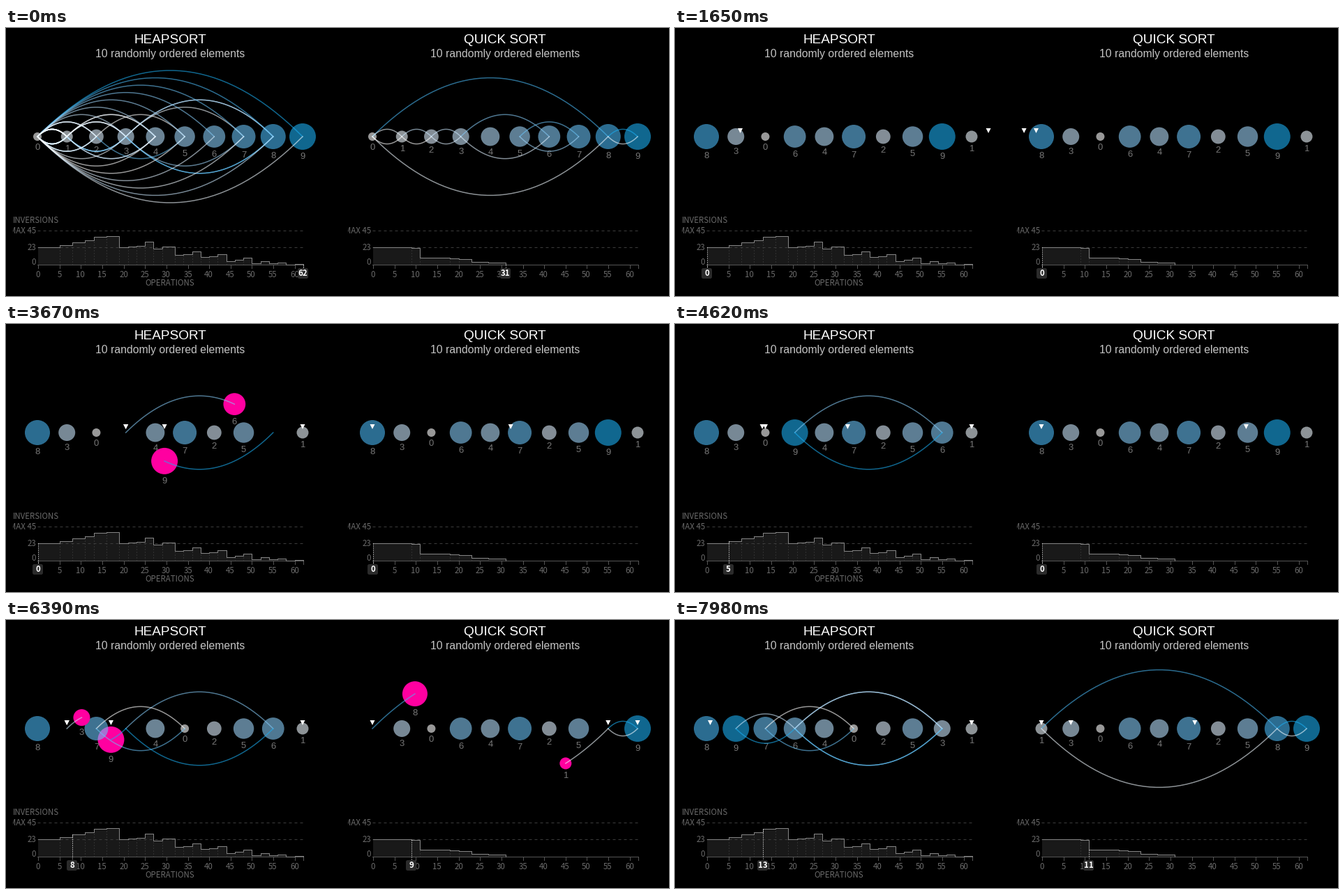
Animation, 950 px wide and 385 px high, one loop 8000 ms. Source, as a matplotlib script:

```python
import matplotlib.pyplot as plt
import numpy as np
from matplotlib.animation import FuncAnimation
from matplotlib.patches import Circle, FancyBboxPatch, Polygon, Rectangle

W, H, DPI = 950, 385, 100
LOOP, INTERVAL = 8000, 40
START = [8, 3, 0, 6, 4, 7, 2, 5, 9, 1]
N = len(START)
MID, GAP = 156, 380 / 9
BASE, OP_W, INV_H = 339.5, 380 / 62, 49 / 45
ALPHA, PINK = 0.6, "#ff00a0"
SANS, LABEL = "Liberation Sans", "Noto Sans CJK JP"

# The picture is refreshed 54 times per loop; (refresh number, ms) knots.
KNOTS = [(1, 870), (3, 1140), (8, 1800), (9, 1920), (14, 2610), (16, 2890),
         (17, 3010), (24, 3950), (25, 4100), (29, 4620), (32, 5040),
         (33, 5190), (36, 5580), (40, 6120), (41, 6240), (46, 6930),
         (48, 7200), (49, 7320), (54, 7980)]
TICKS = np.append(0, np.interp(np.arange(1, 55), *zip(*KNOTS)))


def px(size):
    return size * 72 / DPI


def ease(t):
    return 4 * t ** 3 if t < 0.5 else 1 - 4 * (1 - t) ** 3


def radius(v):
    return 6 * np.sqrt(v + 1)


def color(v):
    u = v / (N - 1)
    r = ((1 - u) + u * 0.105 ** 1.6) ** (1 / 1.6)
    return r, 1 - 0.32 * u, 1 - 0.06 * u


def inversions(a):
    return sum(a[i] > a[j] for i in range(N) for j in range(i + 1, N))


def heap_ops():
    """List of (markers, swap): markers are last, index, root, largest."""
    a, ops = list(START), []

    def swap(i, j, marks):
        a[i], a[j] = a[j], a[i]
        ops.append((marks, (i, j)))

    def sift(root, size, last, i):
        while 2 * root + 1 < size:
            kids = range(2 * root + 1, min(2 * root + 3, size))
            big = max([root, *kids], key=lambda k: a[k])
            ops.append(((last, i, root, big), None))
            if big == root:
                break
            swap(root, big, (last, i, root, root))
            root = big

    for i in range(N // 2 - 1, -1, -1):
        ops.append(((N - 1, i, None, None), None))
        sift(i, N, N - 1, i)
    for end in range(N - 1, 0, -1):
        marks = (end, 0, None, None)
        ops.append((marks, None))
        swap(0, end, marks)
        sift(0, end, end, 0)
    return ops


def quick_ops():
    """List of (markers, swap): markers are pivot, left, right."""
    marks = [(0, k, None) for k in range(1, 8)]
    marks += [(0, 8, 9)] * 2 + [(0, 9, 8)] * 2
    marks += [(0, 1, j) for j in range(7, 1, -1)]
    marks += [marks[-1]] * (31 - len(marks))
    swaps = {9: (8, 9), 11: (0, 8), 18: (1, 2), 20: (0, 1),
             23: (3, 6), 27: (2, 3), 31: (5, 7)}
    return [(m, swaps.get(k)) for k, m in enumerate(marks, 1)]


fig = plt.figure(figsize=(W / DPI, H / DPI), dpi=DPI, facecolor="black")
ax = fig.add_axes([0, 0, 1, 1])
ax.set_xlim(0, W)
ax.set_ylim(H, 0)
ax.axis("off")


def text(x, y, s, size, col, font=LABEL, ha="center", z=2, weight="normal"):
    return ax.text(x, y, s, fontsize=px(size), color=col, family=font, ha=ha,
                   va="baseline", zorder=z, weight=weight)


def line(xs, ys, col, width=1.0, z=2, **kw):
    return ax.plot(xs, ys, color=col, lw=px(width), zorder=z, **kw)[0]


class Panel:
    def __init__(self, left, title, ops, enter, start, period):
        self.x0, self.ops, self.enter = left + 35, ops, enter
        self.start, self.period = start, period
        self.orders = [list(START)]
        for _, pair in ops:
            a = list(self.orders[-1])
            if pair:
                i, j = pair
                a[i], a[j] = a[j], a[i]
            self.orders.append(a)
        self.inv = [inversions(a) for a in self.orders]
        self.swaps = [k for k, op in enumerate(ops, 1) if op[1]]
        mid = self.x0 + 190
        text(mid, 22, title, 19, "#ffffff", SANS)
        text(mid, 42, "10 randomly ordered elements", 15.8, "#c4c4c4", SANS)
        self.draw_chart()
        self.make_parts()

    def at(self, i):
        return self.x0 + i * GAP

    def op_x(self, op):
        return round(self.x0 + op * OP_W) + 0.5

    def inv_y(self, v):
        return np.floor(BASE - v * INV_H) + 0.5

    def draw_chart(self):
        x0, x1 = self.x0, self.x0 + 380
        xs = [self.op_x(k) for k in range(len(self.inv))]
        ys = [self.inv_y(v) for v in self.inv]
        ax.fill_between(xs, ys, BASE, step="post", color="#191919", lw=0, zorder=1)
        for v in (45, 23):
            line([x0, x1], [self.inv_y(v)] * 2, "#3c3c3c", dashes=(4, 4))
        for k in self.swaps:
            line([self.op_x(k)] * 2, [BASE, self.inv_y(self.inv[k])], "#484848",
                 dashes=(1, 3))
        ax.step(xs, ys, where="post", color="#858585", lw=px(1), zorder=3)
        line([x0, x1], [BASE, BASE], "#555555")
        for k in range(0, 61, 5):
            x = self.op_x(k)
            line([x, x], [BASE, BASE + 5], "#555555")
            text(x, 358, str(k), 11.5, "#6a6a6a")
        line([x1 + 0.5] * 2, [BASE, BASE + 5], "#555555")
        for y, s in ((295, "MAX 45"), (319, "23"), (340, "0")):
            text(x0 - 2, y, s, 11.5, "#6a6a6a", ha="right")

    def make_parts(self):
        self.balls = [ax.add_patch(Circle((0, 0), radius(v), lw=0,
                                          zorder=4 - v / 20))
                      for v in range(N)]
        self.names = [text(0, 0, str(v), 13, "#777777", SANS, z=5)
                      for v in range(N)]
        self.arcs = {}
        for k in self.swaps:
            i, j = self.ops[k - 1][1]
            before = self.orders[k - 1]
            self.arcs[k] = [line([], [], color(before[e]), 1.5, 6, alpha=ALPHA)
                            for e in (i, j)]
        self.marks = [ax.add_patch(Polygon(np.zeros((3, 2)), color="white",
                                           lw=0, zorder=8)) for _ in self.enter]
        self.stem = line([], [], "white", 1, 7, dashes=(1, 2))
        self.box = ax.add_patch(FancyBboxPatch(
            (0, 347), 11, 11, boxstyle="round,pad=2,rounding_size=2.5",
            fc="#2b2b2b", ec="none", zorder=8))
        self.count = text(0, 356, "", 11.5, "white", z=9, weight="bold")

    def arc(self, a, b, p):
        """Point at share p of the hop from slot a to b; rightward goes above."""
        x = self.at(a) + (b - a) * GAP * p
        return x, MID - (b - a) * GAP * p * (1 - p)

    def place(self, v, x, y, hot):
        self.balls[v].set(center=(x, y), facecolor=PINK if hot else color(v),
                          alpha=1 if hot else ALPHA)
        self.names[v].set_position((x, y + radius(v) + 13))

    def set_marks(self, step, p):
        none = [None] * len(self.marks)
        now = self.ops[step - 1][0] if step > 0 else none
        old = self.ops[step - 2][0] if step > 1 else none
        for tri, a, b, side in zip(self.marks, old, now, self.enter):
            tri.set_visible(b is not None)
            if b is not None:
                a = side if a is None else a
                x = self.at(a + (b - a) * p)
                tri.set_xy([(x - 3.5, 144), (x + 3.5, 144), (x, 151)])

    def update(self, now):
        step, t = divmod((now - self.start) / self.period, 1)
        step, p = int(step), ease(t)
        done = len(self.ops) if step < 0 else step - 1
        pair = self.ops[step - 1][1] if step > 0 else None
        order = self.orders[max(done, 0)]
        for slot, v in enumerate(order):
            x, y, hot = self.at(slot), MID, False
            if step == 0:
                x = self.at(v + (slot - v) * p)
            elif pair and slot in pair:
                other = pair[0] if slot == pair[1] else pair[1]
                (x, y), hot = self.arc(slot, other, p), True
            self.place(v, x, y, hot)

        for k, (top, low) in self.arcs.items():
            i, j = self.ops[k - 1][1]
            part = 1 if k <= done else p if k == step else 0
            share = np.linspace(0, part, 40)
            top.set_data(*self.arc(i, j, share))
            low.set_data(*self.arc(j, i, share))
            for path in (top, low):
                path.set_visible(part > 0)

        self.set_marks(step, p)
        shown = len(self.ops)
        if step > 0:
            shown = max([k for k in self.swaps if k <= done], default=0)
        x = self.op_x(shown)
        self.stem.set_data([x, x], [self.inv_y(self.inv[shown]), BASE + 5])
        self.box.set_x(x - 5.5)
        self.count.set_position((x, 356))
        self.count.set_text(str(shown))


text(10, 280, "INVERSIONS", 11.5, "#6a6a6a", ha="left")
text(235, 370, "OPERATIONS", 11.5, "#6a6a6a")
panels = [Panel(10, "HEAPSORT", heap_ops(), (N, -1, -1, -1), 816, 488),
          Panel(490, "QUICK SORT", quick_ops(), (-1, -1, N), 817, 489.7)]

# Black strips clip both panels at their edges.
for x, w in ((0, 9.5), (455, 34.5), (935, 15)):
    ax.add_patch(Rectangle((x, 0), w, H, color="black", lw=0, zorder=20))


def update(frame):
    now = frame * INTERVAL + INTERVAL / 2
    tick = TICKS[np.searchsorted(TICKS, now + 1, side="right") - 1]
    for panel in panels:
        panel.update(tick)
    return []


anim = FuncAnimation(fig, update, frames=LOOP // INTERVAL, interval=INTERVAL,
                     init_func=lambda: update(0), repeat=True, repeat_delay=0,
                     blit=False)
plt.show()
```
